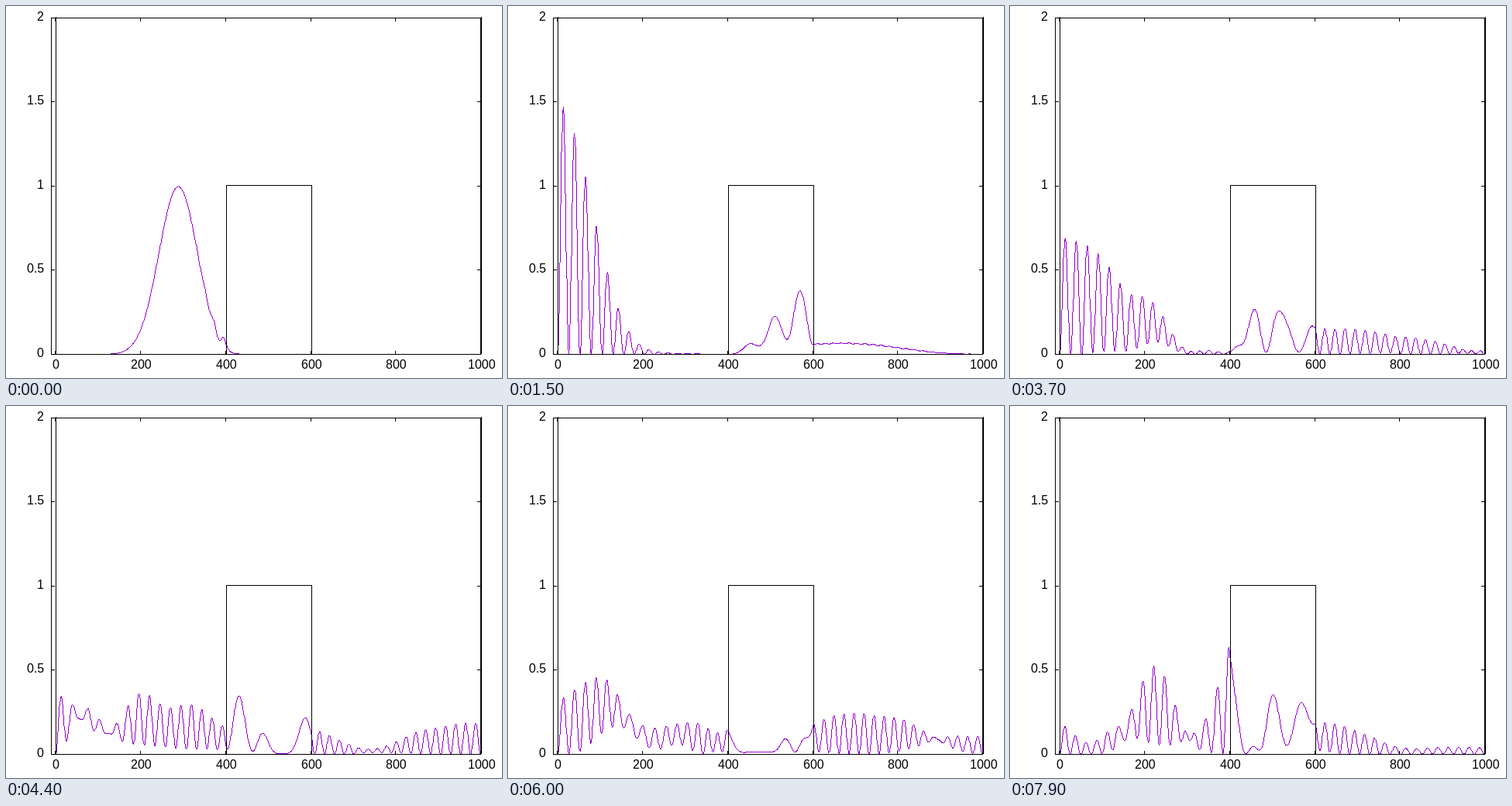
These frames come from a looping animation (640x480 px, 8000 ms). An HTML page with a canvas:

```html
<!DOCTYPE html>
<html lang="en">
<head>
<meta charset="utf-8">
<title>Wave packet at a barrier</title>
<style>
html, body { margin: 0; width: 100%; height: 100%; overflow: hidden; background: #fff; }
canvas { display: block; }
</style>
</head>
<body>
<canvas id="stage" width="640" height="480"></canvas>
<script>
const ctx = document.getElementById("stage").getContext("2d");

// Wave packet in a box of N cells with a square barrier (hbar = m = 1)
const N = 1000, FRAMES = 80, FRAME_MS = 100;
const K0 = 40 * Math.PI / N, WIDTH = 64, START = 250;
const BARRIER = { from: 400, to: 600, height: K0 * K0 / 2 };
const FRAME_TIME = 308, STEPS = 30;

function simulate() {
  const h = FRAME_TIME / STEPS / 2, off = -h / 2;
  const re = new Float64Array(N + 1), im = new Float64Array(N + 1);
  const gr = new Float64Array(N + 1), gi = new Float64Array(N + 1);
  const yr = new Float64Array(N + 1), yi = new Float64Array(N + 1);
  for (let x = 1; x < N; x++) {
    const g = Math.exp(-(((x - START) / WIDTH) ** 2) / 2);
    re[x] = g * Math.cos(K0 * x);
    im[x] = g * Math.sin(K0 * x);
    // inverse pivots of 1 + i h H, energies measured from the mean
    const v = x >= BARRIER.from && x <= BARRIER.to ? BARRIER.height : 0;
    const pr = 1 + off * off * gr[x - 1];
    const pi = h * (1 + v - K0 * K0 / 2) + off * off * gi[x - 1];
    const d = pr * pr + pi * pi;
    gr[x] = pr / d;
    gi[x] = -pi / d;
  }
  // Crank-Nicolson: solve (1 + i h H) y = psi, then psi = 2 y - psi
  function step() {
    for (let x = 1; x < N; x++) {
      const a = re[x] + off * yi[x - 1], b = im[x] - off * yr[x - 1];
      yr[x] = a * gr[x] - b * gi[x];
      yi[x] = a * gi[x] + b * gr[x];
    }
    let sr = 0, si = 0;
    for (let x = N - 1; x > 0; x--) {
      const a = -off * si, b = off * sr;
      sr = yr[x] - (a * gr[x] - b * gi[x]);
      si = yi[x] - (a * gi[x] + b * gr[x]);
      re[x] = 2 * sr - re[x];
      im[x] = 2 * si - im[x];
    }
  }
  const frames = [];
  for (let f = 0; f < FRAMES; f++) {
    for (let s = 0; s < STEPS; s++) step();
    frames.push(Float32Array.from(re, (r, x) => r * r + im[x] * im[x]));
  }
  return frames;
}

const LEFT = 58, RIGHT = 612, TOP = 15, BOTTOM = 449;
const px = x => LEFT + Math.round((x + 10) * (RIGHT - LEFT) / (N + 10));
const py = y => BOTTOM - Math.round(y * (BOTTOM - TOP) / 2);

const hline = (x0, x1, y) => ctx.fillRect(x0, y, x1 - x0 + 1, 1);
const vline = (x, y0, y1) => ctx.fillRect(x, y0, 1, y1 - y0 + 1);

// Crisp one-pixel line
function line(x0, y0, x1, y1) {
  const n = Math.max(Math.abs(x1 - x0), Math.abs(y1 - y0), 1);
  for (let i = 0; i <= n; i++) {
    ctx.fillRect(Math.round(x0 + (x1 - x0) * i / n), Math.round(y0 + (y1 - y0) * i / n), 1, 1);
  }
}

function drawCurve(p) {
  ctx.fillStyle = "#9400d3";
  ctx.save();
  ctx.beginPath();
  ctx.rect(LEFT, TOP, RIGHT - LEFT + 1, BOTTOM - TOP + 1);
  ctx.clip();
  for (let x = 1; x <= N; x++) line(px(x - 1), py(p[x - 1]), px(x), py(p[x]));
  ctx.restore();
}

function drawAxes() {
  hline(LEFT, RIGHT, TOP);
  hline(LEFT, RIGHT, BOTTOM);
  vline(LEFT, TOP, BOTTOM);
  vline(RIGHT, TOP, BOTTOM);
  ctx.font = "16px 'Liberation Sans', Arial, sans-serif";
  const label = (text, left, y) => ctx.fillText(text, Math.round(left), y);
  const width = text => ctx.measureText(text).width;
  for (let x = 0; x <= N; x += 200) {
    vline(px(x), TOP, TOP + 4);
    vline(px(x), BOTTOM - 4, BOTTOM);
    label(x, px(x) + 1.5 - width(x) / 2, 468);
  }
  for (let y = 0; y <= 2; y += 0.5) {
    hline(LEFT, LEFT + 4, py(y));
    hline(RIGHT - 4, RIGHT, py(y));
    label(y, 49 - width(y), py(y) + 4);
  }
}

function drawWalls() {
  const a = px(BARRIER.from) + 1, b = px(BARRIER.to) + 1, top = py(1) - 1;
  vline(px(0) + 1, TOP - 1, BOTTOM - 1);
  vline(px(N) + 1, TOP - 1, BOTTOM - 1);
  vline(a, top, BOTTOM - 1);
  vline(b, top, BOTTOM - 1);
  hline(a, b, top);
}

const frames = simulate();
let shown = -1;

function draw(now) {
  const f = Math.floor(now / FRAME_MS) % FRAMES;
  if (f !== shown) {
    shown = f;
    ctx.fillStyle = "#fff";
    ctx.fillRect(0, 0, 640, 480);
    drawCurve(frames[f]);
    ctx.fillStyle = "#000";
    drawWalls();
    drawAxes();
  }
  requestAnimationFrame(draw);
}
draw(0);
</script>
</body>
</html>
```
